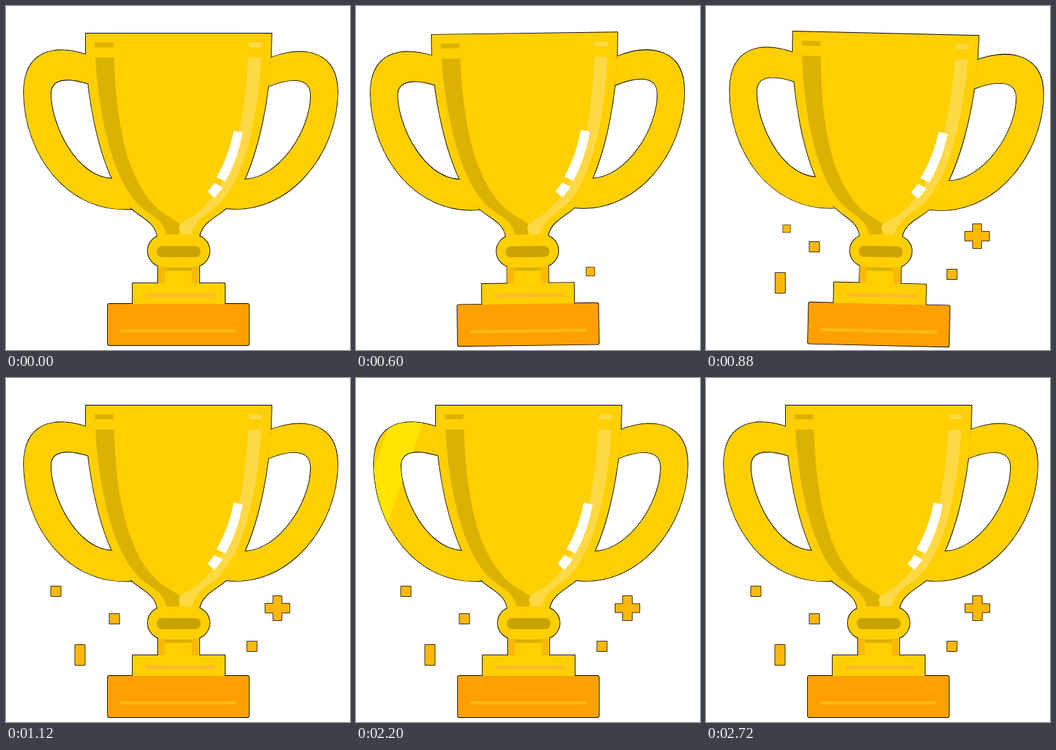
Animation of 500 by 500 pixels, one loop 3.28 s. Source, as an HTML page:

```html
<!DOCTYPE html>
<html lang="en">
<head>
<meta charset="utf-8">
<title>Trophy</title>
<style>
  html, body { margin: 0; width: 100%; height: 100%; overflow: hidden; background: #fff; }
  svg { display: block; width: 100%; height: 100%; }
  .plain {
    --gold: #ffcf00; --shade: #dcb200; --light: #ffd944; --slot: #caa300;
    --side: #f9b900; --trim: #ffb92e; --base: #ffa000; --line: #ffb914;
  }
  .lit {
    --gold: #ffe500; --shade: #e9d277; --light: #ffee9e; --slot: #ddba00;
    --side: #fbd21c; --trim: #fff080; --base: #ffbe18; --line: #ffd028;
  }
  .gold { fill: var(--gold); }
  .shade { fill: var(--shade); }
  .light { fill: var(--light); }
  .slot { fill: var(--slot); }
  .side { fill: var(--side); }
  .trim { fill: var(--trim); }
  .base { fill: var(--base); }
  .line { fill: var(--line); }
  .edge { stroke: #000; stroke-width: 1.8; }
  .spark { fill: #ffb80a; stroke: #000; stroke-width: .8; }
</style>
</head>
<body>
<svg viewBox="0 0 500 500">
  <defs>
    <g id="body">
      <path d="M118 71C70 55 26 65 26 125C26 215 90 302 182 295L154 251C100 248 65 170 65 128C65 102 95 105 120 113Z"/>
      <path d="M385 75C432 57 482 65 482 125C482 215 410 305 320 294L347 252C398 250 443 180 443 130C443 101 410 105 381 117Z"/>
      <path d="M116 40H386L385 76C382 130 370 200 347 252C338 272 330 285 320 294C306 307 284 314 281 336H220C218 314 196 307 182 294C172 285 163 272 154 251C131 200 119 130 116 72Z"/>
      <rect x="221" y="376" width="60" height="30"/>
      <rect x="206" y="333" width="90" height="46" rx="23"/>
      <rect x="184" y="403" width="134" height="32"/>
    </g>
    <rect id="plinth" x="148" y="433" width="205" height="60" rx="2"/>
    <g id="paint">
      <use href="#body" class="gold"/>
      <path class="side" d="M221 379H231V403H221ZM270 379H280V403H270Z"/>
      <path class="shade" d="M231 380H270V385H231Z"/>
      <path class="shade" d="M129 53H156V60H129ZM130 75H157C160 170 176 265 231 303C245 311 252 316 255 319L251 332H233C229 310 211 306 195 291C152 250 134 150 130 75Z"/>
      <path class="light" d="M353 53H372V60H353ZM352 75H371C367 150 350 250 308 290C290 304 276 310 270 332H256C249 324 249 318 260 312L275 303C328 265 348 165 352 75Z"/>
      <path fill="#fff" d="M331 181L344 184Q337 223 319 255L306 249Q324 218 331 181ZM303 257L315 264L303 279L293 270Z"/>
      <rect class="slot" x="219" y="349" width="64" height="16" rx="8"/>
      <rect class="trim" x="203" y="418" width="100" height="5"/>
      <use href="#plinth" class="base"/>
      <rect class="line" x="166" y="470" width="169" height="4.5"/>
    </g>
    <clipPath id="band">
      <path id="beam" d="M0 40H48L-112 493H-160Z"/>
    </clipPath>
  </defs>
  <g id="sparks"></g>
  <g id="trophy">
    <g class="edge"><use href="#body"/><use href="#plinth"/></g>
    <use href="#paint" class="plain"/>
    <g clip-path="url(#band)"><use href="#paint" class="lit"/></g>
  </g>
</svg>
<script>
  const LOOP = 3280, STEP = 40;
  const ORIGIN = [250, 364];
  const SQUARE = 'M-7.5 -7.5H7.5V7.5H-7.5Z';
  const BAR = 'M-7.5 -15H7.5V15H-7.5Z';
  const PLUS = 'M-6.5 -18H6.5V-7H18V7H6.5V18H-6.5V7H-18V-7H-6.5Z';

  // Tracks are lists of [time, value], eased between neighbours.
  const jump = [[200, 0], [320, -20], [503, 0]];
  const tilt = [[370, 0], [480, -4], [744, 3.5], [978, 0]];
  const sweep = [[2045, -15], [2725, 540]];
  const spin = [[1240, 0], [1880, 90]];

  const sparks = [
    { shape: SQUARE, x: 357.5, y: 390, start: 360 },
    { shape: SQUARE, x: 157.5, y: 350, start: 540 },
    { shape: BAR, x: 107.5, y: 402.5, start: 570 },
    { shape: PLUS, x: 394.5, y: 334.5, start: 570, spin },
    { shape: SQUARE, x: 72.5, y: 310, start: 665 }
  ];
  const FLIGHT = 320;

  const byId = id => document.getElementById(id);
  const mix = (a, b, p) => a + (b - a) * p;
  const ease = u => u * u * (3 - 2 * u);

  function valueAt(track, t) {
    if (t <= track[0][0]) return track[0][1];
    for (let i = 1; i < track.length; i++) {
      const [t0, a] = track[i - 1], [t1, b] = track[i];
      if (t < t1) return mix(a, b, ease((t - t0) / (t1 - t0)));
    }
    return track[track.length - 1][1];
  }

  for (const s of sparks) {
    s.node = document.createElementNS('http://www.w3.org/2000/svg', 'path');
    s.node.setAttribute('d', s.shape);
    s.node.setAttribute('class', 'spark');
    byId('sparks').append(s.node);
  }

  function draw(t) {
    byId('trophy').setAttribute('transform',
      `translate(0 ${valueAt(jump, t)}) rotate(${valueAt(tilt, t)} 251 492)`);
    byId('beam').setAttribute('transform', `translate(${valueAt(sweep, t)} 0)`);
    for (const s of sparks) {
      const p = valueAt([[s.start, 0], [s.start + FLIGHT, 1]], t);
      const x = mix(ORIGIN[0], s.x, p), y = mix(ORIGIN[1], s.y, p);
      const angle = s.spin ? valueAt(s.spin, t) : 0;
      s.node.style.display = p > 0 ? '' : 'none';
      s.node.setAttribute('transform', `translate(${x} ${y}) rotate(${angle}) scale(${p})`);
    }
  }

  function frame(now) {
    draw(Math.floor(((now + 1) % LOOP) / STEP) * STEP);
    requestAnimationFrame(frame);
  }
  draw(0);
  requestAnimationFrame(frame);
</script>
</body>
</html>
```
